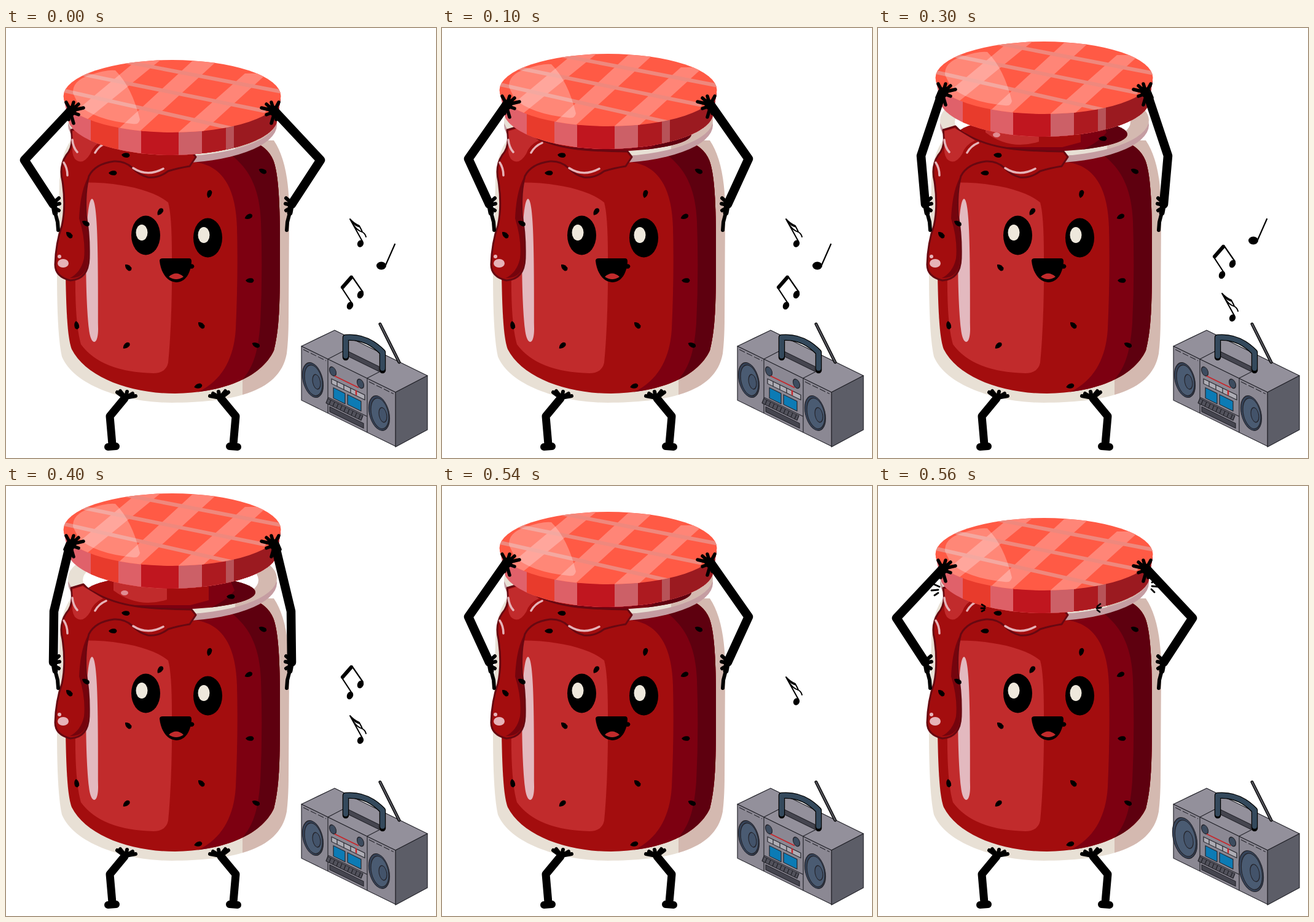
Write an HTML page that moves like this. It is 700x700 px and loops after 660 ms.

```html
<!DOCTYPE html>
<html lang="en">
<head>
<meta charset="utf-8">
<title>Dancing jam jar</title>
<style>
html, body { margin: 0; width: 100%; height: 100%; overflow: hidden; background: #fff; }
svg { display: block; width: 100vw; height: 100vh; }
.line { fill: none; stroke: #000; stroke-linecap: round; stroke-linejoin: round; }
</style>
</head>
<body>
<svg viewBox="0 0 700 700">
  <defs>
    <linearGradient id="glass">
      <stop offset=".8" stop-color="#e8e0d5"/><stop offset=".8" stop-color="#d4b9b0"/>
    </linearGradient>
    <clipPath id="jamClip"><path id="jam" d="M130 205C105 240 97 320 97 400C98 460 100 505 107 523C130 568 200 595 275 595C350 594 415 570 436 525C446 485 446 440 446 350C446 280 443 235 435 215Q425 192 400 185Z"/></clipPath>
    <clipPath id="mouthJam"><ellipse cx="268" cy="173" rx="138" ry="28"/></clipPath>
    <clipPath id="lidTop"><ellipse cx="270.5" cy="111" rx="177" ry="59"/></clipPath>
    <clipPath id="lidSide"><path d="M94 115L103 156C120 187 195 207 271 207C350 206 425 187 440 156L447 115Z"/></clipPath>
  </defs>

  <!-- jar -->
  <path fill="url(#glass)" d="M108 180Q88 205 87 250L83 400Q83 500 91 535C112 585 200 610 270 610C360 609 445 597 457 530Q460 505 460 470L461 300Q461 220 436 183Z"/>
  <use href="#jam" fill="#a30d0e"/>
  <g clip-path="url(#jamClip)">
    <path fill="#7d0011" d="M305 218C345 222 374 250 376 325Q378 400 374 490C371 540 350 578 305 596H460V180Z"/>
    <path fill="#5e000f" d="M365 205C385 222 412 245 415 315Q418 400 414 480C410 535 400 565 365 590H460V180Z"/>
    <path fill="#c12b2c" d="M112 252C170 249 235 260 264 284Q270 305 270 370Q271 470 264 545Q260 562 240 562Q155 560 122 515Q112 480 113 400Z"/>
  </g>
  <path fill="#e3b9bf" d="M140 278C150 280 150 380 150 490C150 518 138 518 135 490C128 430 128 280 140 278Z"/>
  <ellipse cx="271" cy="158" rx="170" ry="62" fill="#c59da2"/>
  <ellipse cx="271" cy="150" rx="170" ry="59" fill="url(#glass)"/>
  <ellipse cx="268" cy="153" rx="143" ry="46" fill="#fff"/>
  <g clip-path="url(#mouthJam)">
    <path fill="#7d0011" d="M120 120H420V210H120Z"/>
    <path fill="#a30d0e" d="M120 120H330V186L300 194H120Z"/>
    <path fill="#5e000f" d="M352 120H420V210H300Q352 195 372 170Z"/>
    <path fill="#c12b2c" d="M175 150H262V185Q215 200 175 170Z"/>
    <ellipse cx="193" cy="174" rx="6" ry="4" fill="#e08c92"/>
  </g>

  <!-- spilled jam -->
  <path fill="#a30d0e" stroke="#680811" stroke-width="3" stroke-linejoin="round" d="M106 166L126 160Q135 170 145 174C185 197 230 200 302 201L309 210L299 225Q280 228 264 233Q248 245 231 243Q216 239 206 228Q194 216 176 217Q145 221 135 241Q128 265 130 305Q136 335 135 375Q134 409 105 411Q80 405 80 385Q81 350 91 322Q98 290 92 250Q86 225 98 207Q111 193 106 166Z"/>
  <path fill="#c12b2c" d="M108 168L125 163L158 183Q142 190 137 205Q125 225 112 213Q106 204 109 190Z"/>
  <path fill="#75040d" d="M134 242Q121 265 119 310Q130 345 127 375Q122 398 104 407Q130 408 133 380Q136 345 129 310Q127 265 134 242Z"/>
  <path class="line" style="stroke:#e6b3b8" stroke-width="3.5" d="M108 182Q109 194 116 202M145 203Q151 192 163 187M94 219Q100 228 100 240M207 228Q230 243 256 229"/>
  <ellipse cx="93" cy="383" rx="9" ry="7" fill="#e6b3b8"/>
  <circle cx="87" cy="372" r="3" fill="#e6b3b8"/>
  <g id="seeds"></g>

  <!-- face -->
  <g id="eye"><ellipse cx="227.500" cy="337.500" rx="23.500" ry="32"/><ellipse cx="221" cy="333" rx="9.500" ry="13" fill="#eee8dc"/></g>
  <use href="#eye" x="101" y="4"/>
  <path d="M250 379Q250 375 255 375H298Q302 375 302 380C301 399 292 414 277 414C261 413 252 397 250 379Z"/>
  <path fill="#c12b2c" d="M265 405Q277 394 289 405Q277 413 265 405Z"/>

  <!-- legs -->
  <g id="leg" class="line">
    <path stroke-width="13" d="M193 603L169 632L173 678"/>
    <path stroke-width="12" d="M166 682L179 681"/>
    <path stroke-width="6" d="M193 602L181 593M194 601L186 591M195 601L197 592M196 601L206 595M195 602L211 599"/>
  </g>
  <use href="#leg" transform="matrix(-1 0 0 1 543 0)"/>

  <!-- lid -->
  <g id="lid">
    <g clip-path="url(#lidSide)" id="bands"></g>
    <g clip-path="url(#lidTop)">
      <path fill="#ff5a45" d="M90 50H450V172H90Z"/>
      <path fill="#ff8577" d="M96 150L216 50H254L131 150ZM179 168L303 54H343L218 168ZM277 173L389 74H425L316 173Z"/>
      <path class="line" style="stroke:#ef887d" stroke-width="6" d="M90 101L370 164M128 76L420 135M195 55L450 104"/>
      <path fill="#fff" fill-opacity=".27" d="M109 106Q108 86 135 77Q165 67 178 69Q205 96 218 149Q216 158 206 156Q145 150 118 125Z"/>
    </g>
  </g>

  <g id="arm" class="line">
    <path id="armBones" stroke-width="14.500"/>
    <path stroke-width="6" d="M77 285L86 277M78 288L87 286M78 292L86 297M76 285L84 316L85 329"/>
    <path stroke-width="9" d="M77 285L80 301"/>
    <g id="hand">
      <circle cx="106" cy="135" r="8" fill="#000"/>
      <path stroke-width="5.500" d="M104 132L98 121M107 131L110 121M108 133L118 124M109 134L126 130M107 137L118 141M105 138L110 155M102 138L102 149M100 134L96 143"/>
    </g>
  </g>
  <use href="#arm" transform="matrix(-1 0 0 1 542 0)"/>

  <path id="impact" class="line" stroke-width="2.800" d="M91 160L100 164M87 170L98 169M92 178L98 174M169 193L174 196M168 199L174 199M169 204L173 202M446 157L454 152M446 163L457 164M445 168L450 173M357 196L362 192M356 199L363 198M357 202L361 205"/>

  <!-- radio -->
  <g stroke="#25252c" stroke-width="1.200" stroke-linejoin="round">
    <path fill="#93909b" d="M481 518L535 492L686 566L634 593Z"/>
    <path fill="#5c5d67" d="M634 593L686 566V654L634 682Z"/>
    <path fill="none" d="M524 539L549 526M588 570L617 555"/>
    <path fill="#45454f" d="M556 526L607 551V559L556 534Z"/>
    <path class="line" stroke-width="5" d="M609 482L640 544"/>
    <path class="line" style="stroke:#55555d" stroke-width="2.500" d="M609 482L640 544"/>
    <path class="line" stroke-width="10.500" stroke-linecap="butt" d="M553 536V504Q587 501 613 528V557"/>
    <path class="line" style="stroke:#34495c" stroke-width="8" d="M553 534V504Q587 501 613 528V554"/>
    <g transform="matrix(1 .49 0 1 481 518)">
      <path fill="#8b8893" d="M0 0H153V88H0Z"/>
      <path fill="none" d="M43 0V88M107 0V88M43 62H107"/>
      <path fill="none" stroke-dasharray="9 3" d="M3 4H40M110 4H150"/>
      <g id="speakers"></g>
      <g fill="#3d4c5f"><ellipse cx="51" cy="16" rx="5.500" ry="7"/><ellipse cx="96" cy="14" rx="5.500" ry="7"/></g>
      <path stroke="#c5282d" stroke-width="2" d="M54 22H93"/>
      <path fill="#aeadb5" d="M49 29H103V37H49Z"/>
      <path fill="none" d="M58 29V37M69 29V37M80 29V37"/>
      <path stroke="#c5282d" stroke-width="2.500" d="M89 28V36"/>
      <path fill="#0c7bb5" d="M52 42H71V59H52ZM75 42H97V58H75Z"/>
      <path fill="#52525c" d="M43 64H100L97 73H40Z"/>
      <path id="keys" fill="none"/>
      <path fill="#45454f" d="M46 76H101V84H46Z"/>
    </g>
  </g>

  <!-- music notes -->
  <g id="flagged">
    <ellipse cx="577" cy="351" rx="5" ry="6" transform="rotate(25 577 351)"/>
    <path class="line" stroke-width="2" d="M580 347L560 311Q566 318 575 322Q579 329 580 332M566 321Q572 330 580 332Q585 335 586 340"/>
    <path d="M560 311Q567 319 575 321L577 325Q568 323 562 316Z"/>
  </g>
  <g id="quarter">
    <ellipse cx="611" cy="387" rx="8" ry="6.500"/>
    <path class="line" stroke-width="2.200" d="M618 386L633 352"/>
  </g>
  <g id="beamed">
    <ellipse cx="560" cy="452" rx="5" ry="6.500" transform="rotate(25 560 452)"/>
    <ellipse cx="577" cy="434" rx="5" ry="6.500" transform="rotate(25 577 434)"/>
    <path class="line" stroke-width="2.200" d="M563 448L546 422M581 430L563 404"/>
    <path class="line" stroke-width="6" d="M548 422L562 406"/>
  </g>
</svg>
<script>
const el = id => document.getElementById(id);

// x, y, angle
const seeds = [[195,207,5], [174,236,0], [251,299,-55], [331,270,-75], [395,307,-25], [418,233,25],
  [199,390,45], [397,411,0], [318,484,45], [196,517,-40], [115,484,80], [407,516,25],
  [313,583,-15], [103,337,45], [130,318,30], [300,388,0], [366,180,0]];
el('seeds').innerHTML = seeds.map(([x, y, a]) =>
  `<path d="M-7 0Q-3 -5 4 -3.500Q9 0 4 3.500Q-3 5 -7 0Z" transform="translate(${x} ${y}) rotate(${a})"/>`).join('');

// left edge and colour of each stripe on the lid's side
const bands = [[90,'#e0616a'], [138,'#e83b2c'], [183,'#dd6067'], [220,'#c0161f'], [281,'#cc6067'],
  [319,'#ad1a20'], [358,'#b75358'], [371,'#9b1a20']];
el('bands').innerHTML = bands.map(([x, c]) =>
  `<path fill="${c}" d="M${x} 110H450V210H${x}Z"/>`).join('');

el('keys').setAttribute('d', Array.from({length: 9}, (_, i) => `M${48 + i * 6} 64l-3 9`).join(''));

// Pose by start time. Notes are vertical offsets; null hides one.
const low = {flagged: 0, quarter: 0, beamed: 0};
const middle = {flagged: 121, quarter: -41, beamed: -50};
const high = {flagged: 63, quarter: null, beamed: -111};
const last = {flagged: 0, quarter: null, beamed: null};
const none = {flagged: null, quarter: null, beamed: null};
const steps = [[0,0,low], [100,1,low], [200,2,middle], [300,3,middle], [400,4,high],
  [500,3,high], [520,2,last], [540,1,last], [560,0,none]];
const elbows = [[30,215], [43,213], [59,210], [70,208], [78,204]];

function speaker(x, y, scale) {
  const ring = (dx, rx, ry, fill) =>
    `<ellipse cx="${x + dx}" cy="${y}" rx="${rx * scale}" ry="${ry * scale}" fill="${fill}"/>`;
  return ring(0, 17, 27, '#36445a') + ring(1, 14.5, 24, '#4a5b72') + ring(6, 6.5, 11.5, '#43536a');
}

let shown = null;
function draw(now) {
  const t = now % 660;
  const step = steps.findLast(s => s[0] <= t);
  if (step !== shown) {
    shown = step;
    const [start, lift, notes] = step;
    const raise = `translate(0 ${-10 * lift})`;
    el('lid').setAttribute('transform', raise);
    el('hand').setAttribute('transform', raise);
    el('armBones').setAttribute('d', `M104 ${136 - 10 * lift}L${elbows[lift]}L77 287`);
    for (const [id, dy] of Object.entries(notes)) {
      el(id).setAttribute('visibility', dy === null ? 'hidden' : 'visible');
      el(id).setAttribute('transform', `translate(0 ${dy ?? 0})`);
    }
    const hit = start === 560;
    el('impact').setAttribute('visibility', hit ? 'visible' : 'hidden');
    const scale = hit ? 1.18 : 1;
    el('speakers').innerHTML = speaker(18.5, 46, scale) + speaker(126.5, 47, scale);
  }
  requestAnimationFrame(draw);
}
draw(performance.now());
</script>
</body>
</html>
```
